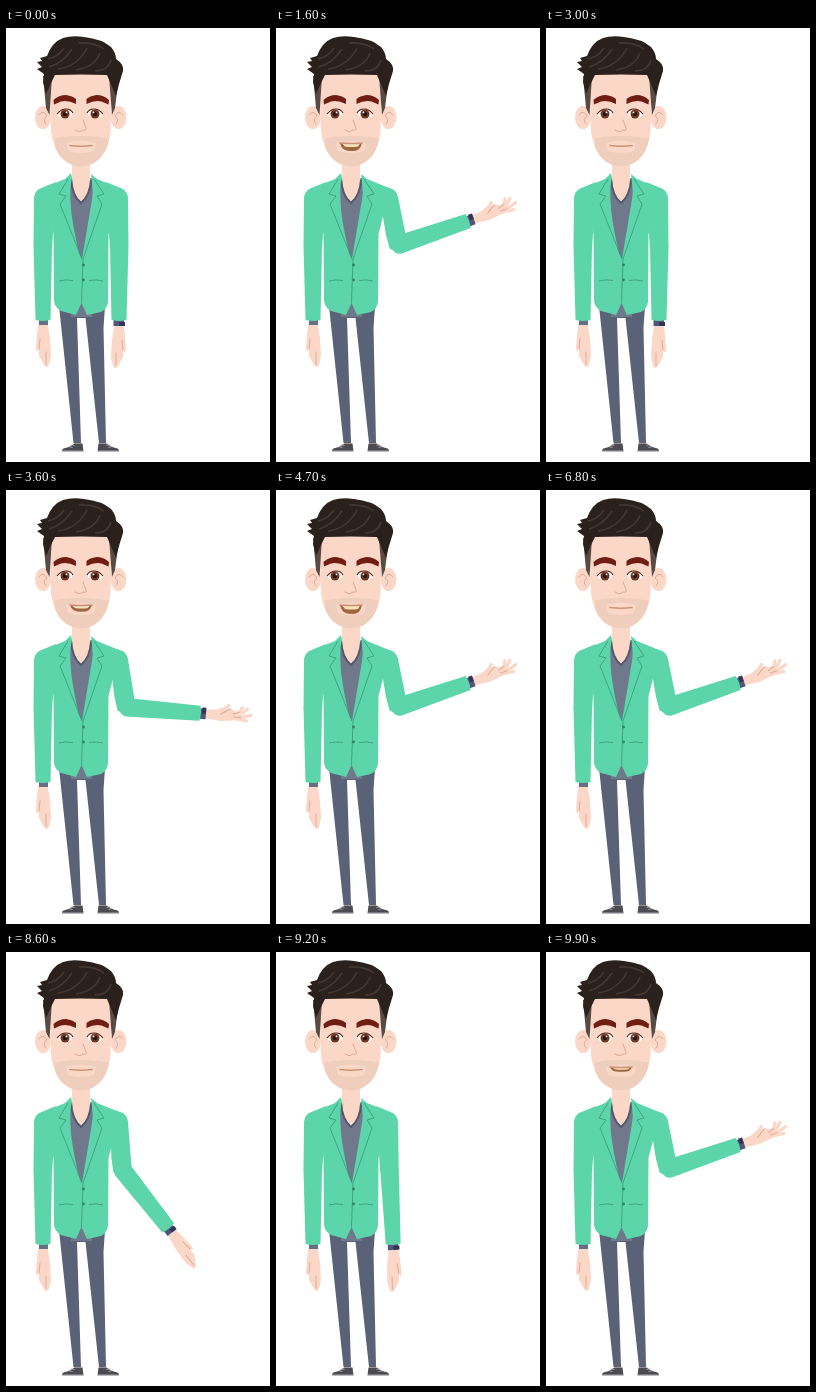
Recreate the animation shown at these times as an HTML page. Size 264 by 434 pixels, loop 10000 ms.

```html
<!DOCTYPE html>
<html>
<head>
<meta charset="utf-8">
<style>
  html, body { margin: 0; height: 100%; overflow: hidden; background: #fff; }
  svg { display: block; width: 264px; height: 434px; }
  .skin { fill: #fbd7c8; }
  .coat { fill: #5dd5aa; }
  .jeans { fill: #596276; }
  .seam { fill: none; stroke: #36987a; stroke-width: .8; }
  .line { fill: none; stroke: #e0ab96; stroke-width: 1; stroke-linecap: round; }
  .finger { fill: none; stroke: #fbd7c8; stroke-width: 3.2; stroke-linecap: round; stroke-linejoin: round; }
</style>
</head>
<body>
<svg viewBox="0 0 264 434">
  <defs>
    <path id="upper" class="coat" d="M-13-16L4-9Q8.500-6 9 0L9.500 48Q0 56-9 50L-10 36-9-4Z"/>
    <path id="fore" class="coat" d="M-9 0A9.500 9.500 0 0 1 9.500 0L7.500 74Q0 76-7.500 74Z"/>
    <g id="hangingHand">
      <path class="skin" d="M-4 0H4L6 14 7 28Q6 35 4 28L4 36-1 45Q-4 49-6 45L-8 36-7 18Z"/>
      <path class="line" d="M4 29L3 19M-3 44L-3 32"/>
    </g>
    <g id="eye">
      <path d="M-7.500 1Q-4-5 1-5T7.500 0Q4 4.500 0 4.500T-7.500 1" fill="#fff"/>
      <circle r="4.500" fill="#71361f"/>
      <circle r="2.200" fill="#2c1410"/>
      <circle cx="1.500" cy="-1.600" r=".9" fill="#fff"/>
      <path d="M-8 0Q-4-5 1-5T8-1" fill="none" stroke="#51231b" stroke-width="1.100"/>
    </g>
    <path id="brow" d="M-11.500 0Q-6-5 1-5Q8-4 11-1V4Q3 0-4 1.500L-11 4.500Z" fill="#701e14"/>
    <g id="shoe">
      <path d="M1 0H9Q14 4 20 5Q22 6 21.500 8H0Z" fill="#4c4b52"/>
      <path d="M0 7.600H22" stroke="#d8d8da" stroke-width=".8"/>
      <path d="M9 2L13 1M11 4L15 3" stroke="#c9c9cd" stroke-width=".7"/>
    </g>
  </defs>

  <!-- legs -->
  <path class="skin" d="M68 410H75V417H68ZM93 410H100V417H93Z"/>
  <path class="jeans" d="M53 278H99L97.500 300 100 415H93L79.500 290H71L75 415H67.500Z"/>
  <use href="#shoe" transform="translate(77.500 415.500) scale(-1 1)"/>
  <use href="#shoe" x="91.500" y="415.500"/>

  <!-- far arm -->
  <g transform="translate(37 170) scale(-1 1)">
    <g transform="translate(0 122)">
      <use href="#hangingHand"/>
      <path d="M-5-1H4V5H-5Z" fill="#667084"/>
    </g>
    <use href="#upper"/>
    <use href="#fore" y="48"/>
  </g>

  <!-- torso -->
  <path fill="#70788b" d="M64 152H87L86 289H65Z"/>
  <path class="skin" d="M66 130H84V151Q84 167 75 174Q66 166 66 151Z"/>
  <path fill="none" stroke="#525a6e" stroke-width="2" d="M65 150Q66 168 75 175Q84 168 85.500 150"/>
  <path class="coat" d="M65 145L66 150Q60 170 73 225L76 231L87 165 85 146 91 151 113 160Q107 190 102.500 206L102 274Q101 281 95 284L81 287 75.500 275 70 287 55 283Q48 279 48 272L47.500 206 37 160 59 151Z"/>
  <path class="seam" d="M62 151L53 166 60 168 54 176 76 231M88 151L98 166 91 168 96 176 77 231 75.500 275M53 253Q60 251 67 252.500M83 252.500Q90 251 97 253"/>
  <g fill="#347f69"><circle cx="77.500" cy="237" r="1.400"/><circle cx="77.500" cy="252" r="1.400"/></g>

  <!-- near arm -->
  <g id="arm">
    <g id="elbow">
      <g transform="translate(0 75)">
        <use id="downHand" href="#hangingHand"/>
        <g id="openHand">
          <path class="skin" d="M-4 0H4L5 17 7 30 3 37-4 36-6 20Z"/>
          <path class="finger" d="M3 14L7 24 10 27M2 30L4 38 9 41M2 32L4 42 8 46M0 32L0 44 2 50M-2 30L-4 46"/>
          <path class="line" d="M7 29L1 20M4 38L2 32M-1 40L-1 33"/>
        </g>
        <path d="M-5.500-1H5V5H-5.500Z" fill="#50577a"/>
        <path d="M0 1H6V5H0Z" fill="#343457"/>
      </g>
      <use href="#fore"/>
    </g>
    <use href="#upper"/>
  </g>

  <!-- head -->
  <g class="skin">
    <ellipse cx="37" cy="89.500" rx="8" ry="11.500"/>
    <ellipse cx="112.500" cy="89.500" rx="8" ry="11.500"/>
    <path d="M43 42H106L104.500 104Q102 124 92 132Q84 138.500 75 138.500T58 132Q48 124 45 104Z"/>
  </g>
  <path class="line" d="M33 87Q37 81 41 88Q36 91 40 96M117 87Q113 81 109 88Q114 91 110 96"/>
  <path fill="#efcebe" d="M49 110H54L56 109Q75 107 94 109L97 110H103Q101 124 92 132Q84 138.500 75 138.500T58 132Q52 127 49 118Z"/>
  <path class="skin" d="M60 115Q75 110 90 115L88 123Q75 127 62 123Z"/>
  <path fill="#584b43" d="M37 48H46L43.500 87 40 80ZM113 48H103L106 87 109 80Z"/>
  <path fill="#2b211c" d="M40 66L37 54 38 46 31 41 36 39 31 34 36 33 34 30 41 28Q46 14 57 10Q66 7 78 9Q96 11 105 19Q110 25 110 31Q118 36 117 43L113 56 110 68 104 54 101 47Q75 46 49 47L45 55Z"/>
  <path fill="none" stroke="#443832" stroke-width="1.500" d="M43 39Q57 35 66 21M52 41Q72 38 81 20M70 42Q89 39 94 25M89 43Q102 43 105 32M42 31Q52 29 58 20M73 15Q88 14 98 21"/>
  <use href="#brow" x="59" y="72"/>
  <use href="#brow" transform="translate(91.500 72) scale(-1 1)"/>
  <g id="eyes"><use href="#eye" x="59" y="86"/><use href="#eye" transform="translate(89 86) scale(-1 1)"/></g>
  <path id="lids" fill="none" stroke="#51231b" stroke-width="1.500" d="M52 87Q59 91 66 87M82 87Q89 91 96 87"/>
  <path class="line" d="M77 92L80 100Q81 103 77 102Q74 105 71 103L69 102"/>
  <path id="lips" fill="#a0663f"/>
  <path id="teeth" fill="#f6e3bd"/>
  <path id="smile" fill="none" stroke="#cb9478" stroke-width="1.700" stroke-linecap="round"/>
</svg>

<script>
const LOOP = 10000, STEP = 100, MOVE = 500;
const raises = [300, 3250, 5900, 7650, 9150];
const lowers = [2450, 5250, 6950, 8300, Infinity];
const part = id => document.getElementById(id);
const set = (id, name, value) => part(id).setAttribute(name, value);
const show = (id, on) => set(id, 'visibility', on ? 'visible' : 'hidden');
const ease = x => { x = Math.min(1, Math.max(0, x)); return x * x * (3 - 2 * x); };

// 0 hangs down, 1 points out; rising goes slightly too far, then settles
function armLift(t) {
  let lift = 0;
  raises.forEach((start, i) => {
    const settle = (t - start - MOVE * .7) / 350;
    lift += ease((t - start) / MOVE) - ease((t - lowers[i]) / MOVE);
    if (settle > 0 && settle < 1) lift += .05 * Math.sin(Math.PI * settle);
  });
  return lift;
}

function drawMouth(open) {
  const drop = 117 + 7 * open, bite = 116 + 3 * open;
  set('lips', 'd', open ? `M64 115Q75 116 86 115Q84 ${drop + 1} 76 ${drop}Q66 ${drop + 1} 64 115Z` : '');
  set('teeth', 'd', open ? `M66 115.500Q75 116.500 84 115.500L82 ${bite}Q75 ${bite + 1} 69 ${bite}Z` : '');
  set('smile', 'd', open ? 'M64 115Q75 116 86 115' : 'M64 117.500Q75 119 86 117.500');
}

function draw() {
  const t = Math.floor((performance.now() - begin) % LOOP / STEP) * STEP;
  const lift = armLift(t);
  const shoulder = -11 * lift;
  const forearm = -109 * lift;
  set('arm', 'transform', `translate(113 170) rotate(${shoulder})`);
  set('elbow', 'transform', `translate(0 48) rotate(${forearm - shoulder})`);
  show('downHand', lift < .55);
  show('openHand', lift >= .55);

  const talking = lift > .5 && !(t > 6600 && t < 7500);
  drawMouth(talking ? Math.abs(Math.sin(t / STEP * 1.9)) : 0);

  const blink = t >= 7100 && t < 7300;
  show('eyes', !blink);
  show('lids', blink);
  requestAnimationFrame(draw);
}
const begin = performance.now();
draw();
</script>
</body>
</html>
```
